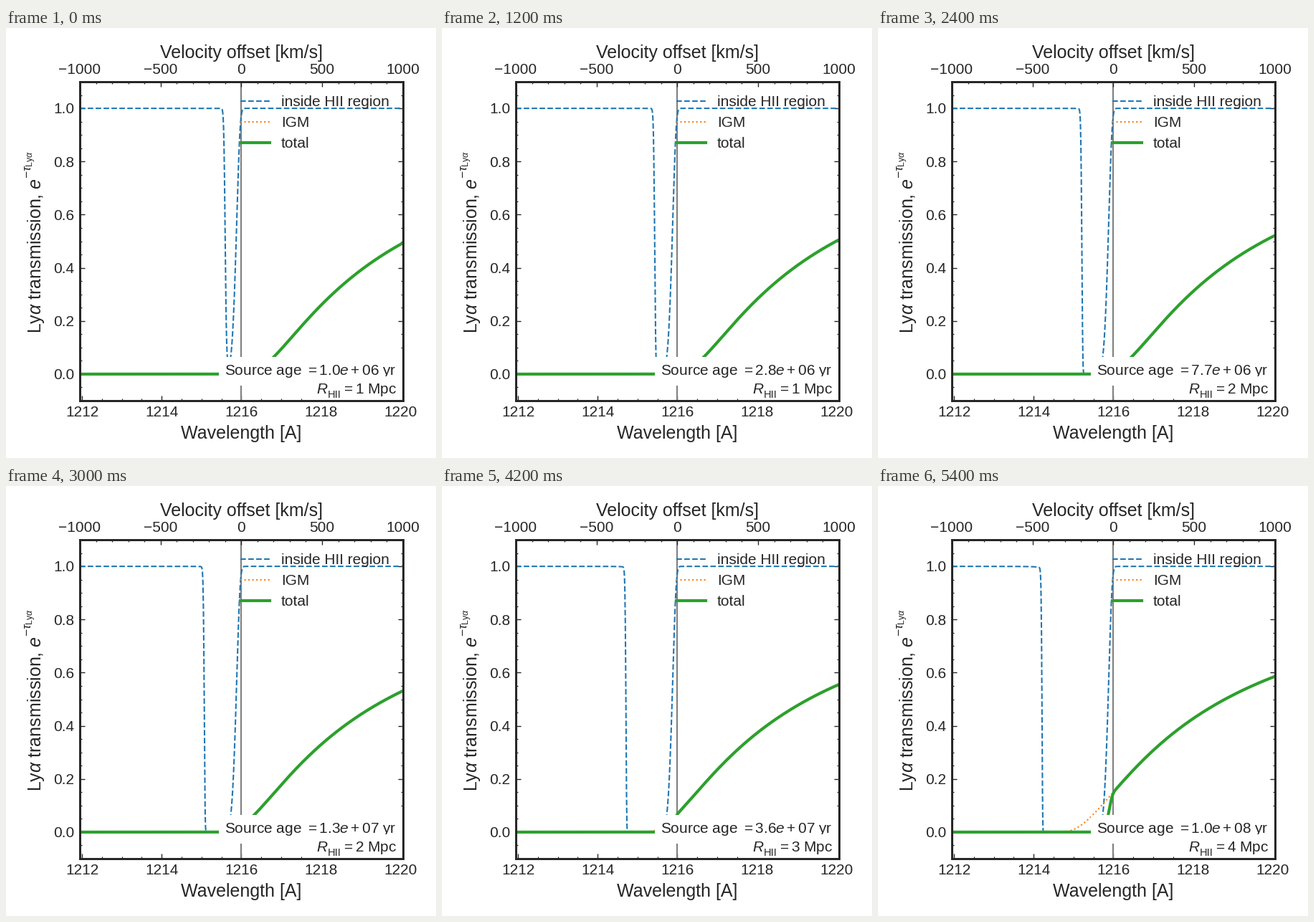
Write a matplotlib script that moves like this. It is 600 px wide and 600 px high and loops after 6 s.

```python
import numpy as np
import matplotlib.pyplot as plt
from matplotlib.animation import FuncAnimation
from matplotlib.lines import Line2D
from matplotlib.patches import Rectangle
from matplotlib.ticker import AutoMinorLocator, MultipleLocator

SIZE, DPI = 600, 100
INK = "0.15"
BLUE, ORANGE, GREEN = "#1f77b4", "#ff7f0e", "#2ca02c"
LEFT, RIGHT, TOP, BOTTOM = 103.0, 553.7, 75.0, 520.0
MIDDLE = (LEFT + RIGHT) / 2

plt.rcParams.update({
    "font.family": "Liberation Sans",
    "mathtext.fontset": "custom",
    "mathtext.rm": "Liberation Sans",
    "mathtext.it": "Liberation Sans:italic",
    "axes.linewidth": 2,
    "axes.edgecolor": INK,
    "text.color": INK,
})

# Physical model, lengths in Angstrom
LYA = 1216.0
SPAN = LYA * 1000 / 299792.458
SIGMA = 0.037          # thermal width
GAMMA = 2.5e-5         # natural width
DEPTH = 38.0           # residual opacity per offset squared
AGES = np.logspace(6, 8, 10)
wave = np.linspace(LYA - SPAN, LYA + SPAN, 1600)


def growth(age):
    return (age / 1e6) ** (1 / 3)


def inside_region(edge):
    r = np.linspace(0, edge, 500)
    d = (LYA - wave)[:, None] - r
    core = np.exp(-0.5 * (d / SIGMA) ** 2) / (SIGMA * np.sqrt(2 * np.pi))
    wing = GAMMA / np.pi / (d ** 2 + 2 * SIGMA ** 2)
    tau = ((core + wing) * DEPTH * r ** 2).sum(axis=1) * (r[1] - r[0])
    return np.exp(-tau)


def neutral_igm(edge):
    d = np.maximum(wave - LYA + edge, 1e-3)
    return np.exp(-(3.28 / d - 0.035))


fig = plt.figure(figsize=(SIZE / DPI, SIZE / DPI), dpi=DPI, facecolor="white")
ax = fig.add_axes([LEFT / SIZE, 1 - BOTTOM / SIZE,
                   (RIGHT - LEFT) / SIZE, (BOTTOM - TOP) / SIZE])
ax.set_xlim(LYA - SPAN, LYA + SPAN)
ax.set_ylim(-0.1, 1.1)
top = ax.twiny()
top.set_xlim(-1000, 1000)


def style_ticks(axis, step, parts, **sides):
    axis.set_major_locator(MultipleLocator(step))
    axis.set_minor_locator(AutoMinorLocator(parts))
    axis.set_tick_params(which="both", direction="in", color=INK, **sides)
    axis.set_tick_params(which="major", length=5, width=1)
    axis.set_tick_params(which="minor", length=2.5, width=0.9)


style_ticks(ax.xaxis, 2, 4, bottom=True, top=False, labelbottom=False)
style_ticks(ax.yaxis, 0.2, 4, left=True, right=True, labelleft=False)
style_ticks(top.xaxis, 500, 5, bottom=False, top=True, labeltop=False)


def label(x, y, s, size=15, ha="center", **kw):
    """Text with its baseline at pixel (x, y), counted from the top left."""
    return fig.text(x / SIZE, 1 - y / SIZE, s, fontsize=size, ha=ha,
                    va="baseline", **kw)


def upright(x, y, s, size):
    label(x, y, s, size, ha="left", rotation=90, rotation_mode="anchor")


def px_line(x0, x1, y, **kw):
    fig.add_artist(Line2D([x0 / SIZE, x1 / SIZE], [1 - y / SIZE] * 2, **kw))


def white_box(x0, y0, x1, y1, z):
    fig.add_artist(Rectangle((x0 / SIZE, 1 - y1 / SIZE), (x1 - x0) / SIZE,
                             (y1 - y0) / SIZE, fc="white", ec="none",
                             transform=fig.transFigure, zorder=z))


for lam in range(1212, 1221, 2):
    x = LEFT + (lam - LYA + SPAN) / (2 * SPAN) * (RIGHT - LEFT)
    label(x, 542.5, str(lam))
for v in range(-1000, 1001, 500):
    x = LEFT + (v + 1000) / 2000 * (RIGHT - LEFT)
    label(x, 64, str(v).replace("-", "\u2212"))
for k in range(6):
    y = BOTTOM - (k / 5 + 0.1) / 1.2 * (BOTTOM - TOP)
    label(95, y + 7.3, f"{k / 5:.1f}", ha="right")

label(MIDDLE, 42, "Velocity offset [km/s]", 18)
label(MIDDLE, 573.5, "Wavelength [A]", 18)
upright(49, 425.5, r"Ly$\alpha$ transmission, $e$", 18)
upright(36.5, 209.5, r"$-\tau_{\mathrm{Ly}\alpha}$", 12.6)

# Curves
ax.axvline(LYA, color="gray", lw=1.5)
hii_line, = ax.plot([], [], "--", color=BLUE, lw=1.5)
igm_line, = ax.plot([], [], ":", color=ORANGE, lw=1.5)
total_line, = ax.plot([], [], "-", color=GREEN, lw=3)

# Legend
rows = [("inside HII region", 102, BLUE, "--", 1.5),
        ("IGM", 131, ORANGE, ":", 1.5),
        ("total", 160, GREEN, "-", 3)]
for name, y, color, ls, lw in rows:
    px_line(327, 368.4, y, color=color, ls=ls, lw=lw, zorder=8,
            solid_capstyle="projecting")
    label(384, y + 7.3, name, ha="left", zorder=8)

# Captions, the lower box overlapping the upper one
white_box(297, 459, 553, 499, 4)
age_text = label(544.5, 484.3, "", ha="right", zorder=5)
white_box(425, 486, 553, 519, 6)
label(433.3, 510.3, "$R$", ha="left", zorder=7)
label(448.3, 515.5, "HII", 10.5, ha="left", zorder=7)
size_text = label(545, 510.3, "", ha="right", zorder=7)


def draw(i):
    scale = growth(AGES[i])
    edge = 0.366 * scale
    hii, igm = inside_region(edge), neutral_igm(edge)
    hii_line.set_data(wave, hii)
    igm_line.set_data(wave, igm)
    total_line.set_data(wave, hii * igm)
    age_text.set_text(f"Source age $={AGES[i]:.1e}$ yr")
    size_text.set_text(f"$={0.83 * scale:.0f}$ Mpc")
    return hii_line, igm_line, total_line, age_text, size_text


anim = FuncAnimation(fig, draw, frames=len(AGES), interval=600, repeat=True)
plt.show()
```
